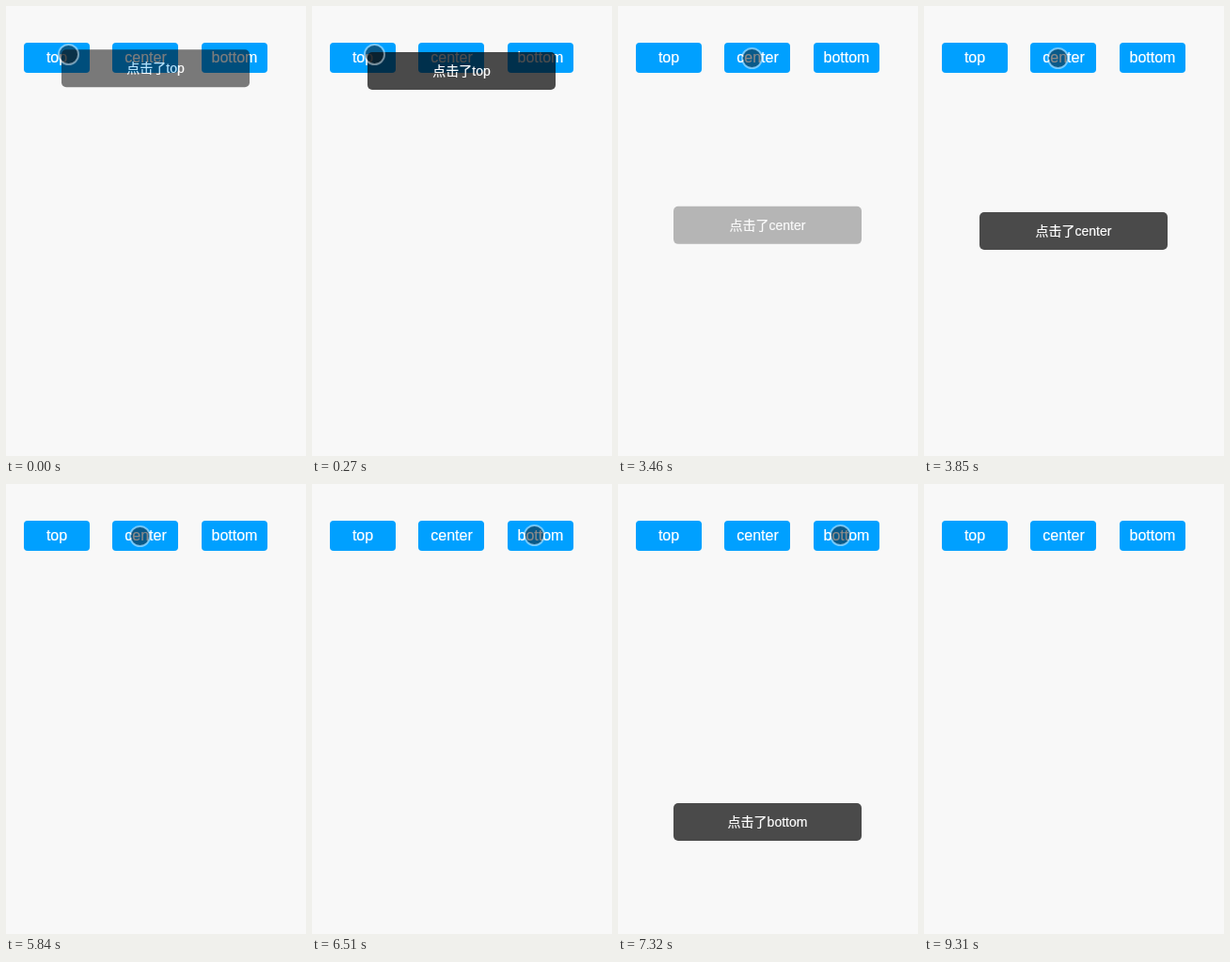
Animation of 319x478 px, one loop 9.98 s. Source, as an HTML page:

```html
<!DOCTYPE html>
<html lang="zh-CN">
<head>
<meta charset="utf-8">
<title>Toast positions</title>
<style>
  html, body { margin: 0; width: 100%; height: 100%; overflow: hidden; background: #f8f8f8; }
  svg { display: block; }
  text {
    fill: #fff;
    stroke: #fff;
    stroke-width: .2px;
    text-anchor: middle;
    font: 16px "Liberation Sans", Arial, "Noto Sans CJK SC", "Noto Sans CJK", sans-serif;
  }
  #toast text { font-size: 14px; }
  .button { fill: #00a0ff; }
</style>
</head>
<body>
<svg width="319" height="478" viewBox="0 0 319 478">
  <g id="buttons"></g>
  <g id="toast">
    <rect x="59" width="200" height="40" rx="5" fill="#000" fill-opacity=".7"/>
    <text id="message" x="159" y="25"></text>
  </g>
  <g id="cursor">
    <circle r="10" fill="#141414" fill-opacity=".5"/>
    <circle r="10.5" fill="none" stroke="#fff" stroke-opacity=".45" stroke-width="2"/>
  </g>
</svg>
<script>
const LOOP = 9980;
const FRAME = 135;       // motion advances in visible steps of this length
const CURSOR_END = 9000;
const $ = id => document.getElementById(id);

// "lead" is how far into its motion something already is on its first step.
const toasts = [
  { name: 'top', y: 49, start: -120, end: 2330, lead: 110, duration: 510 },
  { name: 'center', y: 219, start: 3460, end: 5840, lead: 110, duration: 510 },
  { name: 'bottom', y: 339, start: 6900, end: 9310, lead: 160, duration: 510 }
];
const moves = [
  { start: 2610, lead: 160, duration: 675, dx: 76, dy: 4 },
  { start: 6120, lead: 110, duration: 510, dx: 94, dy: -1 }
];

const easeOut = u => 1 - (1 - u) ** 2;
const easeInOut = u => u * u * (3 - 2 * u);
const show = (node, visible) => node.setAttribute('visibility', visible ? 'visible' : 'hidden');
const place = (node, x, y) => node.setAttribute('transform', `translate(${x} ${y})`);

function stepped(t, { start, lead, duration }) {
  if (t < start) return 0;
  const step = Math.floor((t - start + 15) / FRAME);
  return Math.min(1, (step * FRAME + lead) / duration);
}

$('buttons').innerHTML = toasts.map(({ name }, i) => {
  const x = 19 + 94.5 * i;
  return `<rect class="button" x="${Math.floor(x)}" y="39" width="70" height="32" rx="4"/>
    <text x="${x + 35}" y="60">${name}</text>`;
}).join('');

function drawToast(t) {
  const toast = toasts.find(({ start, end }) => t >= start && t < end);
  show($('toast'), toast);
  if (!toast) return;
  const progress = easeOut(stepped(t, toast));
  $('message').textContent = '点击了' + toast.name;
  $('toast').setAttribute('opacity', progress);
  place($('toast'), 0, toast.y - 10 * (1 - progress));
}

function drawCursor(t) {
  let x = 66.5, y = 51.5;
  for (const move of moves) {
    const progress = easeInOut(stepped(t, move));
    x += move.dx * progress;
    y += move.dy * progress ** 3; // the path bends towards its end
  }
  show($('cursor'), t < CURSOR_END);
  place($('cursor'), x, y);
}

const start = performance.now();
function tick() {
  const t = (performance.now() - start) % LOOP;
  drawToast(t);
  drawCursor(t);
  requestAnimationFrame(tick);
}
tick();
</script>
</body>
</html>
```
